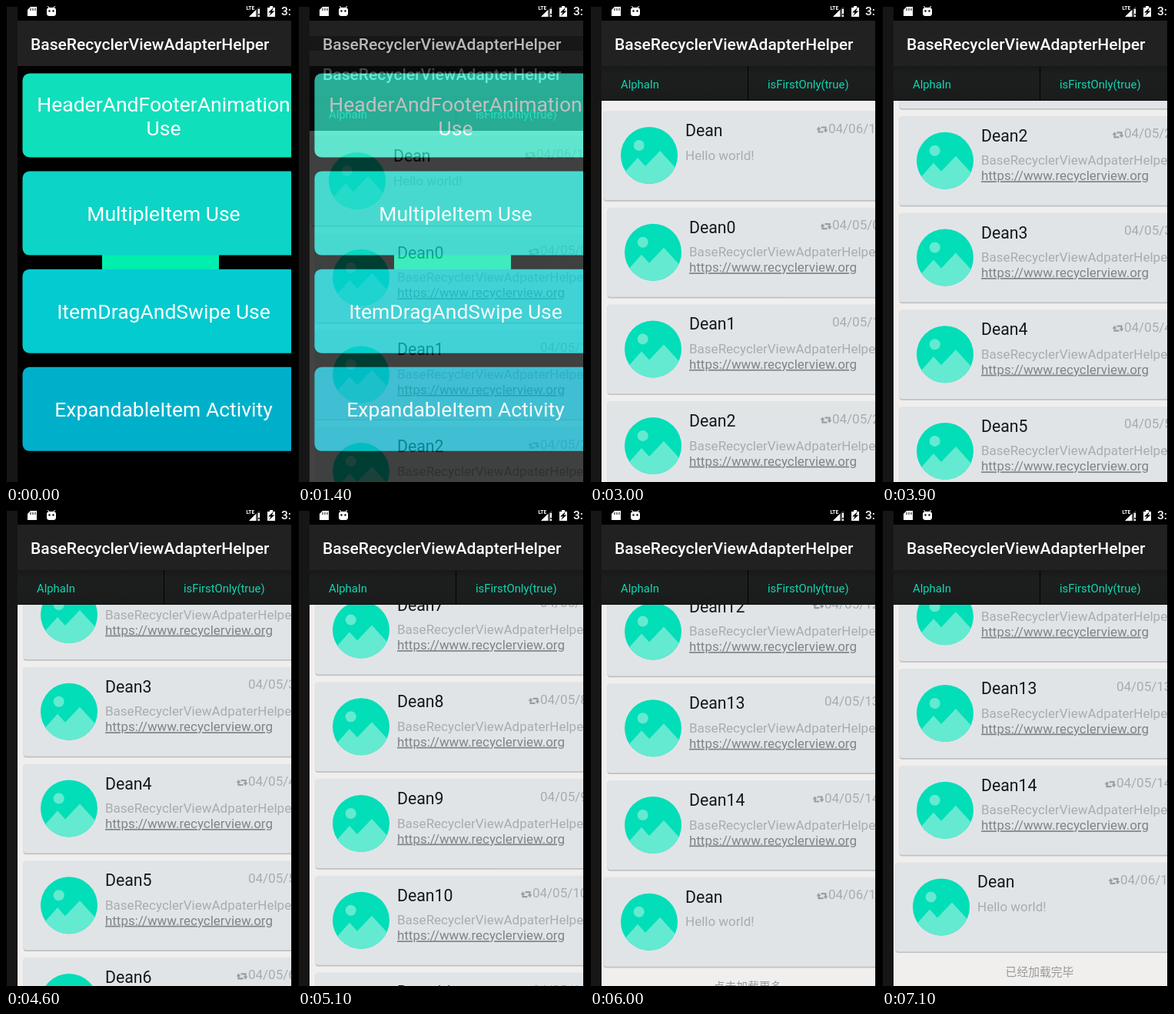
An HTML page that plays this animation: 372x618 px, repeating every 7.3 s.

```html
<!DOCTYPE html>
<html lang="en">
<head>
<meta charset="utf-8">
<title>List animation demo</title>
<style>
  html, body { margin: 0; width: 100%; height: 100%; overflow: hidden; background: #000; }
  svg { display: block; width: 372px; height: 618px; font-family: Roboto, "Noto Sans CJK SC", "Noto Sans CJK", sans-serif; }
  .bar { font-size: 21.05px; font-weight: 500; fill: #fff; }
  .menu { font-size: 26.5px; fill: #fff; text-anchor: middle; }
  .tab { font-size: 14.8px; fill: #12d6b3; }
  .name { font-size: 21.3px; fill: #161718; }
  .soft { font-size: 17px; fill: #a9acae; }
  .link { font-size: 16.95px; fill: #7d8488; text-decoration: underline; }
  .foot { font-size: 14.8px; fill: #999; text-anchor: middle; }
</style>
</head>
<body>
<svg viewBox="0 0 372 618">
  <defs>
    <clipPath id="screen"><rect x="15" y="19" width="356" height="599"/></clipPath>
    <clipPath id="listArea"><rect x="15" y="123" width="356" height="540"/></clipPath>
    <clipPath id="disc"><circle r="37"/></clipPath>
    <linearGradient id="tabFill" x2="0" y2="1">
      <stop offset="0" stop-color="#171918"/>
      <stop offset=".25" stop-color="#1d1f1e"/>
      <stop offset="1" stop-color="#1a1c1b"/>
    </linearGradient>
    <g id="picture">
      <circle r="37" fill="#02deb8"/>
      <g clip-path="url(#disc)" fill="#64ead1">
        <path d="M-32 22L-15 3L-5 14L14 -6L36 18V40H-32Z"/>
        <circle cx="-13.3" cy="-13" r="7"/>
      </g>
    </g>
    <g id="repeat" fill="#9b9ea0">
      <path d="M3 4V8H9M6 2H12V6" fill="none" stroke="#9b9ea0" stroke-width="2.2"/>
      <path d="M0 5L3 1L6 5ZM9 5H15L12 9Z"/>
    </g>
  </defs>

  <rect width="372" height="618"/>
  <rect x="1" y="1" width="14" height="617" fill="#161616"/>
  <rect x="15" width="357" height="19"/>

  <g fill="#fff">
    <path d="M32 1H40V13H28V5Z"/>
    <path d="M32 3V6M35 3V6M38 3V6" stroke="#000" stroke-width="1"/>
    <rect x="53" y="2" width="12" height="11" rx="3.5"/>
    <path d="M54 0L57 3M64 0L61 3" stroke="#fff"/>
    <circle cx="56.5" cy="6.5" r="1.2" fill="#000"/>
    <circle cx="61.5" cy="6.5" r="1.2" fill="#000"/>
    <text x="312.5" y="5" font-size="6.5" font-weight="700">LTE</text>
    <path d="M316 14L330 1V14Z" fill="#555"/>
    <path d="M316 14L325 5V14Z"/>
    <path d="M328 4H330V10H328ZM328 12H330V14H328Z"/>
    <path d="M340 2H343V0H347V2H350V14H340Z"/>
    <path d="M348 2L341 8.5H344.5L342 13L349.5 6.5H346Z" fill="#000"/>
    <text x="358" y="12" font-size="15.5" font-weight="500">3:</text>
  </g>

  <g clip-path="url(#screen)">
    <g id="menu">
      <rect x="15" y="19" width="356" height="59" fill="#212121"/>
      <text class="bar" x="32" y="57">BaseRecyclerViewAdapterHelper</text>
      <rect x="125" y="257" width="152" height="152" fill="#00efae"/>
    </g>
    <g id="page">
      <rect x="15" width="356" height="660"/>
      <rect x="15" y="123" width="356" height="537" fill="#f0efee"/>
      <g clip-path="url(#listArea)"><g id="list"></g></g>
      <rect x="15" y="19" width="356" height="59" fill="#212121"/>
      <text class="bar" x="32" y="57">BaseRecyclerViewAdapterHelper</text>
      <rect x="15" y="78" width="356" height="45" fill="url(#tabFill)"/>
      <rect x="205" y="78" width="1" height="45"/>
      <rect x="15" y="122" width="356" height="1" fill="#0c0d0d"/>
      <text class="tab" x="40" y="107">AlphaIn</text>
      <text class="tab" x="231" y="107">isFirstOnly(true)</text>
      <ellipse id="glow" cx="193" cy="640" rx="290" ry="82" fill="#212121"/>
    </g>
  </g>
  <rect x="371" width="1" height="618"/>
</svg>
<script>
const LOOP = 7300, PITCH = 125.7, ROWS = 15;
const $ = id => document.getElementById(id);

function add(parent, tag, attrs, text) {
  const el = document.createElementNS('http://www.w3.org/2000/svg', tag);
  for (const k in attrs) el.setAttribute(k, attrs[k]);
  if (text) el.textContent = text;
  parent.append(el);
  return el;
}
const label = (parent, cls, x, y, text) => add(parent, 'text', { class: cls, x, y }, text);

// Menu screen
const buttons = [
  ['#10dfbb', 'HeaderAndFooterAnimation', 'Use'],
  ['#0cd4c6', 'MultipleItem Use'],
  ['#03cbd0', 'ItemDragAndSwipe Use'],
  ['#00b0ca', 'ExpandableItem Activity']
];
const button = (y, fill, opacity = 1) =>
  add($('menu'), 'rect', { x: 21.5, y, width: 367, height: 109, rx: 9, fill, opacity });
let press;
buttons.forEach(([fill, ...lines], i) => {
  const y = 87.5 + i * 127.1;
  button(y, fill);
  if (!i) press = button(y, '#fff', .13);
  lines.forEach((s, n) =>
    label($('menu'), 'menu', 205, y + 64 + n * 31 - (lines.length - 1) * 15, s));
});

// List screen: a greeting card, numbered rows, the greeting again, a footer
function card(i) {
  const edge = i === 0 || i === ROWS + 1;
  const g = add($('list'), 'g', { transform: `translate(${edge ? 18 : 23} ${136 + i * PITCH})` });
  const plate = (x, y, fill) => add(g, 'rect', { x, y, width: 380, height: 116, rx: 3, fill });
  plate(-.8, 1, '#d9dadb');
  plate(0, 1.7, '#bfc2c4');
  plate(0, 0, '#e0e4e7');
  add(g, 'use', { href: '#picture', x: 59, y: 58 });
  const n = i - 1;
  label(g, 'name', 106, 33, edge ? 'Dean' : 'Dean' + n);
  const dateX = !edge && n > 9 ? 282 : 292;
  label(g, 'soft', dateX, 28.5, edge ? '04/06/16' : '04/05/' + n);
  if (edge || n % 2 === 0) add(g, 'use', { href: '#repeat', x: dateX - 15.5, y: 19.5 });
  label(g, 'soft', 106, 63.5, edge ? 'Hello world!' : 'BaseRecyclerViewAdpaterHelper');
  if (!edge) label(g, 'link', 106, 83.5, 'https://www.recyclerview.org');
}
for (let i = 0; i <= ROWS + 1; i++) card(i);
const foot = label($('list'), 'foot', 205, 136 + (ROWS + 1) * PITCH + 147.5, '');

// Each entry holds until the next: [time, value, ...]
const fade = [[0, 0, 39, 0], [1400, .28, 39, -6], [1500, .68, 17, 0], [1600, .93, 5, 0], [1700, 1, 0, 0]];
const scroll = [
  [0, 0], [3100, 20], [3200, 70], [3300, 125], [3400, 150],
  [3600, 185], [3700, 250], [3800, 318], [3900, 370.3], [4000, 398], [4100, 410], [4300, 413],
  [4600, 435], [4700, 530], [4800, 660], [4900, 800], [5000, 930], [5100, 1044],
  [5200, 1180], [5300, 1325], [5400, 1455], [5500, 1565], [5600, 1640],
  [6000, 1670.5], [6100, 1683], [6200, 1689.8]
];
const glow = [[0, 0], [6300, .04], [6400, .07], [6500, .09], [6800, .07], [6900, .05], [7000, .02], [7100, 0]];
const at = (steps, t) => steps.findLast(s => s[0] <= t);

function draw(now) {
  const t = now % LOOP;
  const [, alpha, drop, shift] = at(fade, t);
  press.style.display = t < 900 ? 'none' : '';
  $('page').setAttribute('opacity', alpha);
  $('page').setAttribute('transform', `translate(0 ${drop})`);
  $('list').setAttribute('transform', `translate(0 ${shift - at(scroll, t)[1]})`);
  $('glow').setAttribute('opacity', at(glow, t)[1]);
  foot.textContent = t < 6300 ? '点击加载更多' : '已经加载完毕';
}

const start = performance.now();
function tick() {
  draw(performance.now() - start);
  requestAnimationFrame(tick);
}
tick();
</script>
</body>
</html>
```
